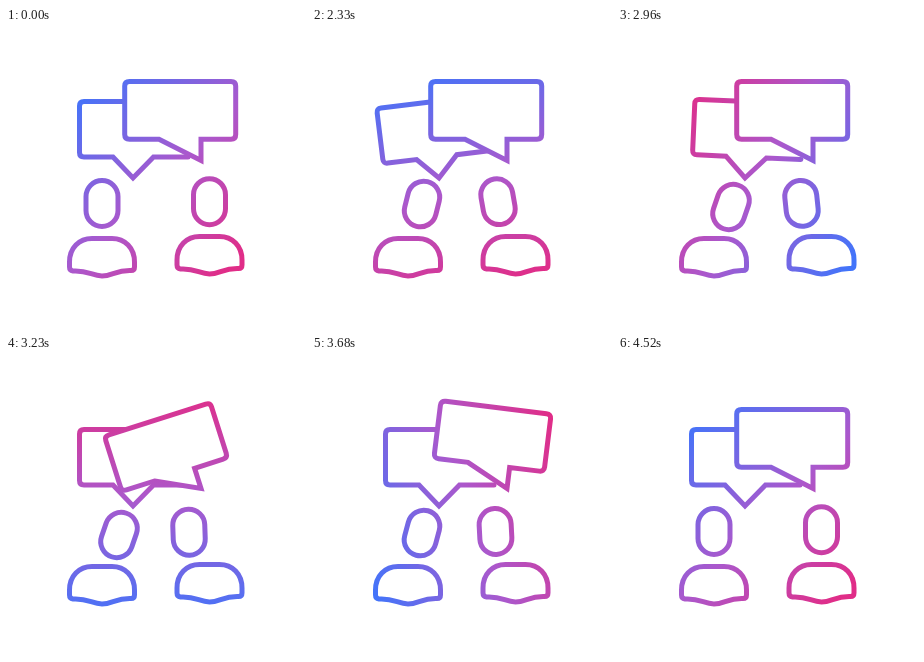
Animation, 300 px wide and 300 px high, one loop 4550 ms. Source, as an HTML page with a canvas:

```html
<!DOCTYPE html>
<html lang="en">
<head>
<meta charset="utf-8">
<title>Conversation</title>
<style>
  html, body { margin: 0; width: 100%; height: 100%; overflow: hidden; background: #fff; }
  canvas { display: block; width: 300px; height: 300px; }
</style>
</head>
<body>
<canvas id="stage"></canvas>
<script>
const SIZE = 300, LOOP = 4550, START = 2030, STEP = 30;
const canvas = document.getElementById('stage');
const ctx = canvas.getContext('2d');
const dpr = window.devicePixelRatio || 1;
canvas.width = canvas.height = SIZE * dpr;

// Rows: time in ms after START, then one or more values.
const GRADIENT = [[-30, 45], [300, 72], [930, 210], [1200, 270], [1650, 339], [2490, 405]];
const SWING = [[-30, 0], [150, -19], [510, 13], [690, -10], [960, 3], [1200, 0]];
const LEFT_HEAD = [[-30, 0, 0, 0], [300, 14, 0.5, 14], [480, 17, 3.5, 19],
  [1300, 17, 3.5, 19], [1650, 14, 1.5, 15], [2250, 0, 0, 0]];
const RIGHT_HEAD = [[-30, 0, 0, 0], [300, -17.5, 0, -10], [930, -20, 1.7, -6],
  [1200, -20.5, 2.5, -2], [1650, -20, 1.8, -3], [2250, 0, 0, 0]];
const FRONT_DELAY = 1080;

const backBubble = new Path2D(
  'M182 129H147.5L127 150L107 129H78Q73.5 129 73.5 124.5V78Q73.5 73.5 78 73.5H150');
const frontBubble = new Path2D(
  'M153 111.3L195 132.5V111.3H225Q229.7 111.3 229.7 106.5V58Q229.7 53.5 225 53.5' +
  'H123.5Q118.7 53.5 118.7 58V106.5Q118.7 111.3 123.5 111.3Z');
const shoulders = new Path2D(
  'M-29 32.5Q-32.5 32 -32.5 28.5V23.5C-32.5 9.5 -23 0 -10 0H10C23 0 32.5 9.5 32.5 23.5' +
  'V28.5Q32.5 32 29 32C14 31.5 10 37.5 0 37.5C-10 37.5 -14 31.5 -29 32.5Z');
const head = new Path2D();
head.roundRect(-16, -23, 32, 46, 16);

// Smooth interpolation that comes to rest at turning points and ends.
function slope(rows, i, k) {
  const a = rows[i - 1], b = rows[i], c = rows[i + 1];
  if (!a || !c || (b[k] - a[k]) * (c[k] - b[k]) <= 0) return 0;
  return (c[k] - a[k]) / (c[0] - a[0]);
}

function sample(rows, t, k = 1) {
  const last = rows.length - 1;
  if (t <= rows[0][0]) return rows[0][k];
  if (t >= rows[last][0]) return rows[last][k];
  let i = 0;
  while (t >= rows[i + 1][0]) i++;
  const span = rows[i + 1][0] - rows[i][0];
  const p = (t - rows[i][0]) / span, q = 1 - p;
  return rows[i][k] * q * q * (1 + 2 * p) + rows[i + 1][k] * p * p * (1 + 2 * q)
    + span * p * q * (q * slope(rows, i, k) - p * slope(rows, i + 1, k));
}

const rad = deg => deg * Math.PI / 180;

function paint(angle) {
  const dx = 115 * Math.cos(rad(angle)), dy = 115 * Math.sin(rad(angle));
  const g = ctx.createLinearGradient(150 - dx, 150 - dy, 150 + dx, 150 + dy);
  g.addColorStop(0, '#4274fa');
  g.addColorStop(0.53, '#ab58cc');
  g.addColorStop(1, '#e02d88');
  return g;
}

// The shape moves while the gradient stays fixed to the stage.
function draw(shape, x, y, deg, px = 0, py = 0, fill = false) {
  const m = new DOMMatrix().translate(x, y).rotate(deg).translate(-px, -py);
  const path = new Path2D();
  path.addPath(shape, m);
  if (fill) ctx.fill(path);
  ctx.stroke(path);
}

function drawHead(rows, t, x, y) {
  draw(head, x + sample(rows, t, 1), y + sample(rows, t, 2), sample(rows, t, 3));
}

function render(t) {
  ctx.setTransform(dpr, 0, 0, dpr, 0, 0);
  ctx.fillStyle = '#fff';
  ctx.fillRect(0, 0, SIZE, SIZE);
  ctx.strokeStyle = paint(sample(GRADIENT, t));
  ctx.lineWidth = 5;
  ctx.lineCap = 'round';
  ctx.lineJoin = 'miter';
  draw(backBubble, 127, 150, sample(SWING, t), 127, 150);
  draw(frontBubble, 195, 132.5, sample(SWING, t - FRONT_DELAY), 195, 132.5, true);
  drawHead(LEFT_HEAD, t, 96, 175.5);
  drawHead(RIGHT_HEAD, t, 203.5, 173.7);
  draw(shoulders, 96, 210.5, 0);
  draw(shoulders, 203.5, 208.5, 0);
}

const origin = performance.now();
function tick() {
  const t = (performance.now() - origin) % LOOP;
  render(t < START ? -STEP : Math.floor((t - START) / STEP) * STEP);
  requestAnimationFrame(tick);
}
tick();
</script>
</body>
</html>
```
